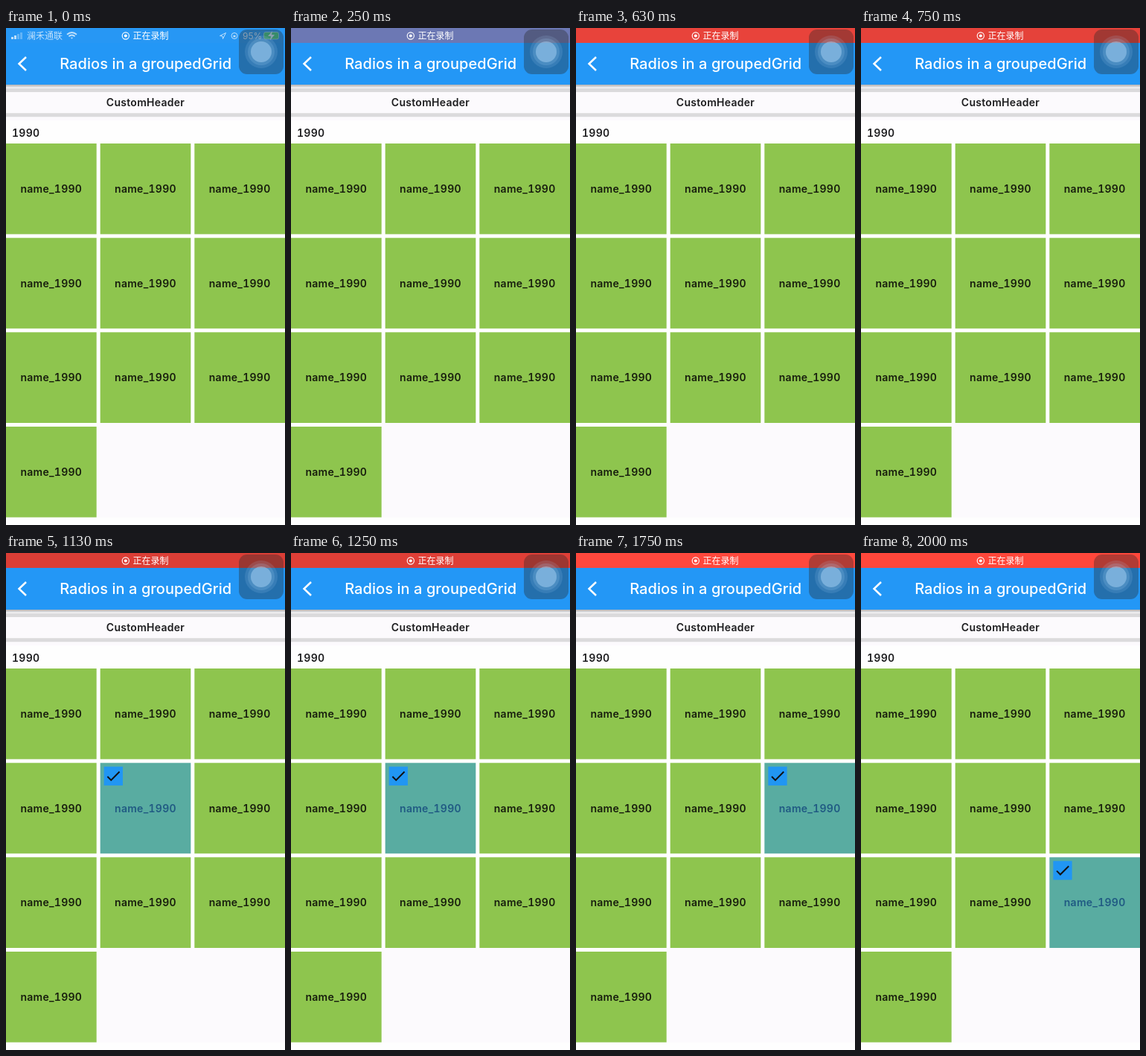
An HTML page for the animation above (2.12 s loop, 375 by 667 pixels).

```html
<!DOCTYPE html>
<html lang="en">
<head>
<meta charset="utf-8">
<title>Radios in a groupedGrid</title>
<style>
  html, body { margin: 0; width: 100%; height: 100%; overflow: hidden; background: #fefefe; }
  svg { display: block; width: 375px; height: 667px; font-family: Inter, sans-serif; }
  .label {
    font-size: 14px; font-weight: 600; letter-spacing: .28px;
    font-variant-numeric: tabular-nums; fill: #1c1c1e;
  }
  .title { font-size: 20px; font-weight: 500; letter-spacing: .07px; fill: #fff; }
  .status { font: 12px "Noto Sans CJK SC", "Noto Sans CJK", sans-serif; fill: #fff; }
  .middle { text-anchor: middle; }
</style>
</head>
<body>
<svg viewBox="0 0 375 667">
  <defs>
    <linearGradient id="shadow" x2="0" y2="1">
      <stop stop-color="#000" stop-opacity=".3"/>
      <stop offset="1" stop-color="#000" stop-opacity="0"/>
    </linearGradient>
  </defs>
  <rect width="375" height="667" fill="#fefefe"/>
  <path d="M0 76H375V124H0zM121.7 530H375V656.7H121.7z" fill="#fcfafd"/>

  <path d="M0 83.5H375M0 116.7H375" stroke="#dbdadc" stroke-width="5"/>
  <text class="label middle" x="187.5" y="105">CustomHeader</text>
  <text class="label" x="8" y="146">1990</text>
  <g id="grid"></g>

  <rect y="76" width="375" height="5" fill="url(#shadow)"/>
  <rect y="19" width="375" height="57" fill="#2397f6"/>
  <path d="M27 39 17.5 48 27 57" fill="none" stroke="#fff" stroke-width="2.5"/>
  <text class="title middle" x="187.7" y="55">Radios in a groupedGrid</text>

  <rect id="bar" width="375" height="20"/>
  <g fill="none" stroke="#fff" stroke-width="1.1">
    <circle cx="160.8" cy="10.5" r="4.6"/>
    <circle cx="160.8" cy="10.5" r="2" fill="#fff" stroke="none"/>
  </g>
  <text class="status" x="170.5" y="14.7">正在录制</text>

  <g id="indicators">
    <path d="M7 15V12h3v3zM11 15V10h3v5z" fill="#fff"/>
    <path d="M15 15V8h3v7zM19 15V6h3v9z" fill="#fff" opacity=".4"/>
    <text class="status" x="28" y="14.7">澜禾通联</text>
    <g fill="none" stroke="#fff" stroke-width="1.8">
      <path d="M82 8.8Q88.5 3.2 95 8.8M84.4 11.3Q88.5 7.8 92.6 11.3"/>
      <path d="M86.8 12.8h3.4L88.5 14.8z" fill="#fff" stroke="none"/>
      <path d="M287.5 10.5 295.5 6.5 291.5 14.5 291 11z" stroke-width="1"/>
      <circle cx="307" cy="10.5" r="4" stroke-width="1"/>
      <rect x="305.5" y="9.8" width="3" height="2.4" fill="#fff" stroke="none"/>
    </g>
    <text x="318" y="14.5" font-size="12" fill="#fff">95%</text>
    <rect x="346.5" y="5.5" width="20" height="9.5" rx="2.5" fill="#4cd964" stroke="#fff" stroke-opacity=".5"/>
    <path d="M358 4 352 11h4l-1 5.5 6-7.5h-4z" fill="#fff"/>
  </g>

  <rect x="313" y="2" width="60" height="60" rx="11" fill="#282828" fill-opacity=".36"/>
  <g fill="#a8d2f4">
    <circle cx="343" cy="32" r="22" fill-opacity=".14"/>
    <circle cx="343" cy="32" r="18" fill-opacity=".18"/>
    <circle cx="343" cy="32" r="14" fill-opacity=".5"/>
  </g>
</svg>
<script>
const LOOP = 2120, STEP = 125, CELL = 365 / 3, PITCH = CELL + 5;

// Time, then red, green and blue
const barColors = [
  [0, 39, 151, 244], [250, 108, 120, 180], [630, 232, 67, 59],
  [1130, 219, 62, 54], [1380, 227, 64, 56], [1750, 255, 72, 61], [2120, 255, 71, 58]
];
// Start time and index of the selected cell
const selections = [[0, -1], [880, 4], [1380, 5], [1880, 8]];

const byId = id => document.getElementById(id);

byId("grid").innerHTML = Array.from({ length: 10 }, (_, i) => `
  <g transform="translate(${i % 3 * PITCH} ${155 + Math.floor(i / 3) * PITCH})">
    <rect class="tile" width="${CELL}" height="${CELL}"/>
    <text class="label middle" x="60.8" y="66">name_1990</text>
    <g class="check" transform="translate(5 5)">
      <rect width="25.3" height="25.3" fill="#2196f3"/>
      <path transform="translate(.6 .6)" fill="#111"
        d="M9 16.17 4.83 12 3.41 13.41 9 19 21 7 19.59 5.59z"/>
    </g>
  </g>`).join("");
const cells = [...byId("grid").children];

function barColor(t) {
  const next = Math.max(1, barColors.findIndex(k => k[0] >= t));
  const [a, b] = [barColors[next - 1], barColors[next]];
  const p = (t - a[0]) / (b[0] - a[0]);
  return `rgb(${[1, 2, 3].map(c => Math.round(a[c] + (b[c] - a[c]) * p))})`;
}

function draw(now) {
  const t = Math.round(Math.floor(now % LOOP / STEP) * STEP / 10) * 10;
  const selected = selections.filter(s => s[0] <= t).pop()[1];
  byId("bar").setAttribute("fill", barColor(t));
  byId("indicators").setAttribute("opacity", .7 * Math.max(0, 1 - t / 220));
  cells.forEach((cell, i) => {
    const on = i === selected;
    cell.querySelector(".tile").setAttribute("fill", on ? "#59aca1" : "#8ec54e");
    cell.querySelector(".label").style.fill = on ? "#205a83" : "#171d0d";
    cell.querySelector(".check").style.display = on ? "" : "none";
  });
}

const start = performance.now();
function tick() {
  draw(performance.now() - start);
  requestAnimationFrame(tick);
}
tick();
</script>
</body>
</html>
```
